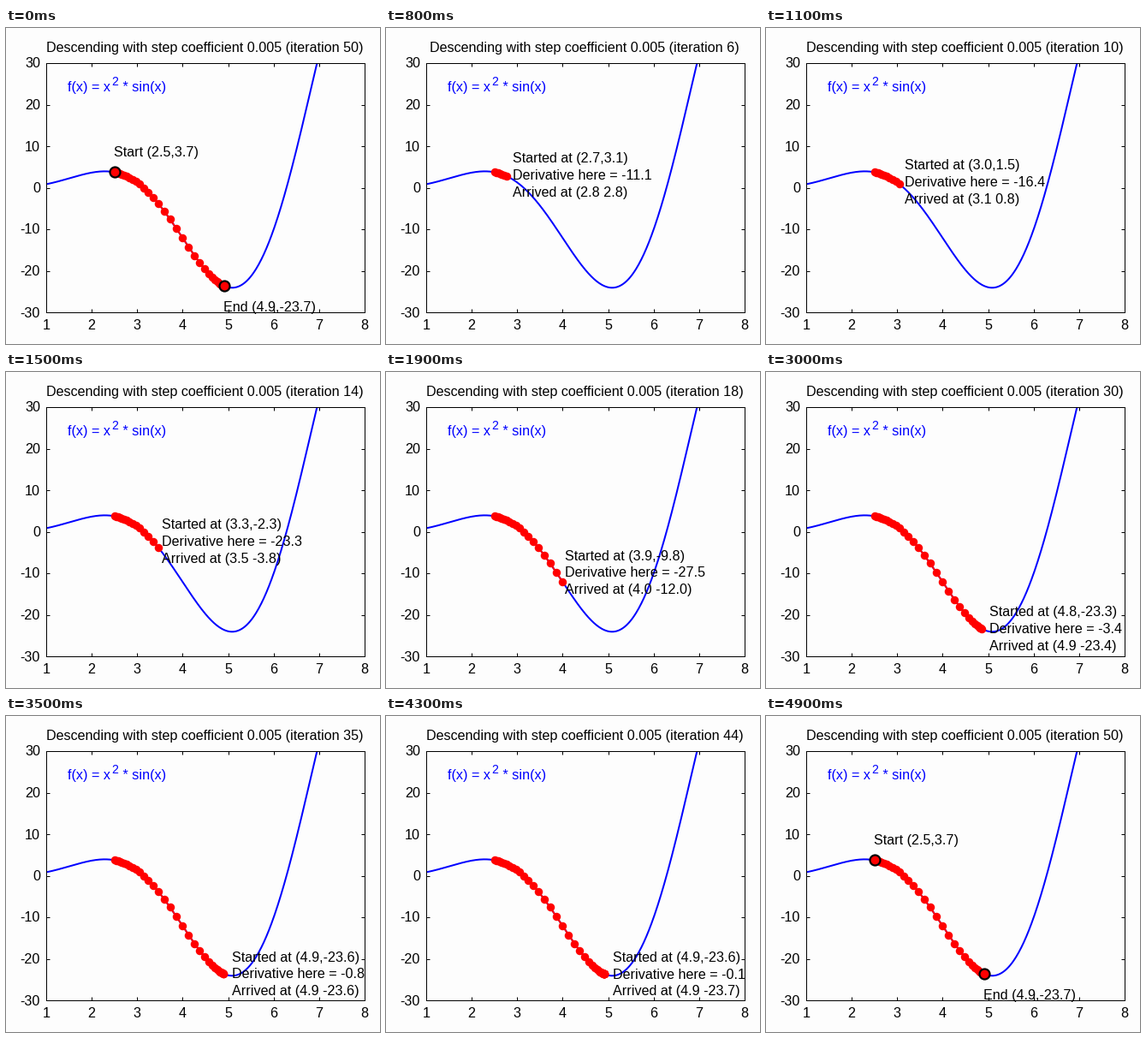
Recreate the animation shown at these times as a matplotlib script. Size 437 by 369 pixels, loop 5.2 s.

```python
import numpy as np
import matplotlib.pyplot as plt
from matplotlib.animation import FuncAnimation

W, H, DPI = 437, 369, 64
PX = 72 / DPI                      # points per pixel
LEFT, RIGHT, TOP, BOTTOM = 47, 419, 41, 332
PAPER = "#fdfdfd"
STEP, LAST = 0.005, 50
FRAMES, HOLD = 52, 3
SKIPS = (8, 19, 34)                # ticks at which one iteration is jumped over

plt.rcParams["font.family"] = "Liberation Sans"


def f(x):
    return x**2 * np.sin(x)


def slope(x):
    return 2 * x * np.sin(x) + 2 * x**2 * np.cos(x)


def descend(x, count):
    path = [x]
    for _ in range(count):
        path.append(path[-1] - STEP * slope(path[-1]))
    return np.array(path)


def to_px(x, y):
    return (LEFT + (x - 1) / 7 * (RIGHT - LEFT),
            TOP + (30 - y) / 60 * (BOTTOM - TOP))


xs = descend(2.5, LAST)
ys = f(xs)

fig = plt.figure(figsize=(W / DPI, H / DPI), dpi=DPI, facecolor=PAPER)
ax = fig.add_axes([LEFT / W, 1 - BOTTOM / H,
                   (RIGHT - LEFT) / W, (BOTTOM - TOP) / H], facecolor=PAPER)
ax.set(xlim=(1, 8), ylim=(-30, 30),
       xticks=range(1, 9), yticks=range(-30, 31, 10))
ax.tick_params(direction="in", length=4 * PX, width=PX, top=True, right=True,
               labelbottom=False, labelleft=False)
for spine in ax.spines.values():
    spine.set_linewidth(PX)

# Overlay measured in pixels from the top left corner
page = fig.add_axes([0, 0, 1, 1])
page.set(xlim=(0, W), ylim=(H, 0))
page.axis("off")


def put(x, y, text="", ha="left", size=16.1, color="black"):
    return page.text(x, y, text, ha=ha, va="baseline",
                     fontsize=size * PX, color=color)


for v in range(1, 9):
    put(to_px(v, 0)[0], 352, str(v), "center")
for v in range(-30, 31, 10):
    put(40, to_px(1, v)[1] + 5.5, str(v), "right")

put(72, 74, "f(x) = x", color="blue")
put(123, 67, "2", size=14, color="blue")
put(131.5, 74, "* sin(x)".rjust(9), color="blue")

grid = np.linspace(1, 8, 500)
ax.plot(grid, f(grid), color="blue", lw=2 * PX)
trail, = ax.plot([], [], "o-", color="red", lw=2 * PX, ms=9.5 * PX, mew=0)
ends, = ax.plot(xs[[0, -1]], ys[[0, -1]], "o", ms=12 * PX, mfc="red",
                mec="black", mew=2.2 * PX, zorder=3)

title = put(232, 28, ha="center")
notes = [put(0, 0) for _ in range(3)]
marks = []
for name, i, shift in (("Start", 0, 5), ("End", -1, -5)):
    x, y = to_px(xs[i], ys[i] + shift)
    marks.append(put(x - 1, y + 6, f"{name} ({xs[i]:.1f},{ys[i]:.1f})"))


def iteration(frame):
    tick = frame - HOLD
    if tick < 0:
        return LAST
    return min(LAST, tick + 1 + sum(tick >= s for s in SKIPS))


def draw(frame):
    n = iteration(frame)
    done = n == LAST
    title.set_text(f"Descending with step coefficient {STEP} (iteration {n})")
    trail.set_data(xs[:n + 1], ys[:n + 1])

    x0, y0, x1, y1 = xs[n - 1], ys[n - 1], xs[n], ys[n]
    lines = (f"Started at ({x0:.1f},{y0:.1f})",
             f"Derivative here = {slope(x0):.1f}",
             f"Arrived at ({x1:.1f} {y1:.1f})")
    px, py = to_px(x0, y0)
    for row, (note, line) in enumerate(zip(notes, lines)):
        note.set_text(line)
        note.set_position((px + 10, py + 5.5 + 19.8 * (row - 1)))
        note.set_visible(not done)
    for item in (ends, *marks):
        item.set_visible(done)
    return [title, trail, ends, *notes, *marks]


anim = FuncAnimation(fig, draw, frames=FRAMES, interval=100,
                     repeat=True, repeat_delay=0, blit=False)
plt.show()
```
